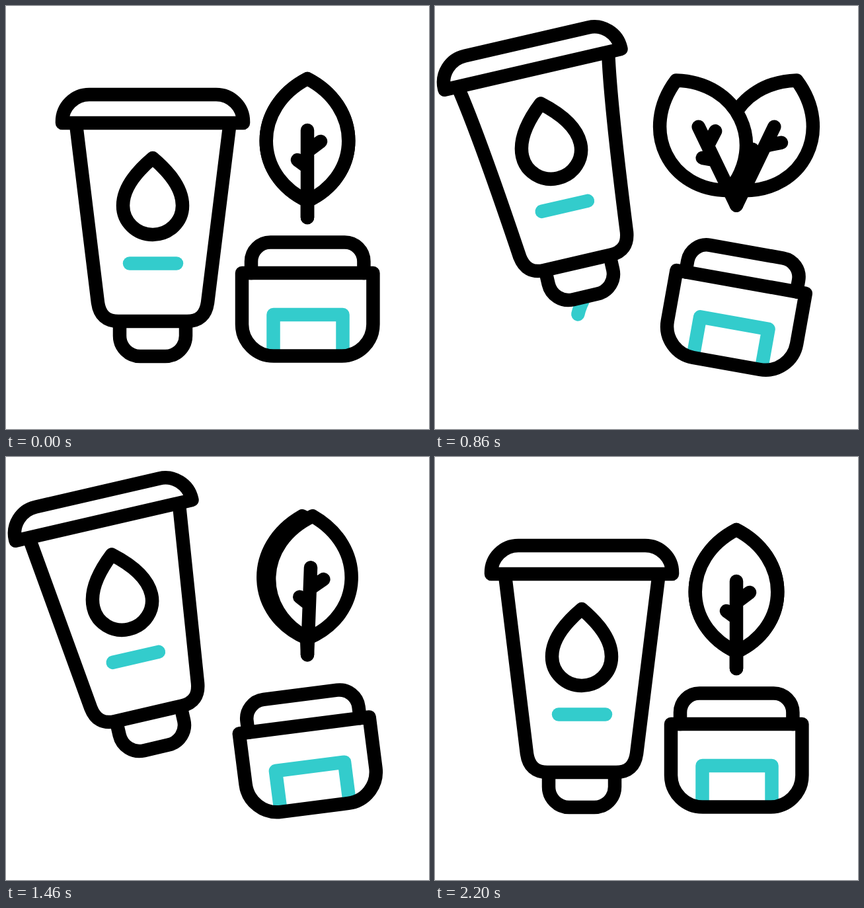
An HTML page that plays this animation: 640x640 px, repeating every 2400 ms.

```html
<!DOCTYPE html>
<html lang="en">
<head>
<meta charset="utf-8">
<title>Cosmetics icon</title>
<style>
  html, body { margin: 0; height: 100%; overflow: hidden; background: #fff; }
  svg { display: block; width: 100%; height: 100%; }
  .ink { fill: #fff; stroke: #000; stroke-width: 20.5; stroke-linecap: round; stroke-linejoin: round; }
  .teal { fill: none; stroke: #3cc; }
</style>
</head>
<body>
<svg viewBox="0 0 640 640">
  <defs>
    <g id="leaf">
      <path d="M456 110C373 153 373 256 456 295C539 256 539 153 456 110Z"/>
      <path fill="none" d="M456 188V320M476 205L456 220M441 233L456 244"/>
    </g>
  </defs>
  <g class="ink">
    <path id="drip" class="teal" pathLength="1" d="M228 438C205 478 215 500 240 517S307 570 269 623"/>
    <g id="tube">
      <path id="cap"/>
      <path id="walls"/>
      <path id="rim"/>
      <path d="M222 230Q177 268 177 302a45 44 0 0 0 90 0Q267 268 222 230z"/>
      <path class="teal" d="M187 389.5H258"/>
    </g>
    <use id="back" href="#leaf"/>
    <use id="front" href="#leaf"/>
    <g id="jar">
      <path id="lid"/>
      <path class="teal" stroke-linecap="butt" d="M404.5 525V467H509.5V525"/>
      <path id="pot" fill="none"/>
    </g>
  </g>
</svg>
<script>
const LOOP = 2400;
const el = id => document.getElementById(id);
const [drip, tube, walls, back, front, jar] =
  ['drip', 'tube', 'walls', 'back', 'front', 'jar'].map(el);

// U shape around x = cx: straight at the rim, rounded at the base.
function cup(id, cx, half, rim, base, r, end = '') {
  const side = base - Math.sign(base - rim) * r;
  const [left, right] = [cx - half, cx + half];
  el(id).setAttribute('d', `M${left} ${rim}V${side}Q${left} ${base} ${left} ${base}`
    .replace(/Q.*/, '') + arc(left + r, base, r, base < rim) +
    `H${right - r}` + arc(right, side, r, base < rim) + `V${rim}${end}`);
}

function arc(x, y, r, clockwise) {
  return `A${r} ${r} 0 0 ${+clockwise} ${x} ${y}`;
}

cup('cap', 222, 50, 480, 530, 31);
cup('rim', 222, 137, 177, 134, 41, 'z');
cup('lid', 456.2, 85.2, 404, 357.5, 29);
cup('pot', 456.2, 99.2, 404, 529.5, 48, 'z');

// Smooth 0..1 step between two times.
function ease(t, from, to) {
  const p = Math.min(1, Math.max(0, (t - from) / (to - from)));
  return p * p * (3 - 2 * p);
}

function pose(node, dy, angle, x, y) {
  node.setAttribute('transform', `translate(0 ${dy}) rotate(${angle} ${x} ${y})`);
}

function draw(t) {
  const tilt = ease(t, 200, 700) - ease(t, 1500, 2000);
  pose(tube, -89.5 * tilt, -13 * tilt, 222, 506);

  const squeeze = 5 * (ease(t, 700, 900) - ease(t, 900, 1100));
  walls.setAttribute('d', `M106.5 183Q${116 + squeeze} 260 139 449` +
    `Q143 477 170 477H274Q301 477 305 449Q${328.5 - squeeze} 260 338 183`);

  const head = ease(t, 790, 1090), tail = ease(t, 1000, 1400);
  drip.style.display = head > tail ? '' : 'none';
  drip.setAttribute('stroke-dasharray', `${head - tail} 2`);
  drip.setAttribute('stroke-dashoffset', -tail);

  const lift = -25 * (ease(t, 200, 1200) - ease(t, 1200, 2200));
  const spread = -27 * ease(t, 200, 800) + 31 * ease(t, 800, 1300)
    - 10.3 * ease(t, 1300, 1900) + 6.3 * ease(t, 1900, 2200);
  pose(back, lift, -spread, 456, 320);
  pose(front, lift, spread, 456, 320);

  const bob = 25 * (ease(t, 200, 700) - 2 * ease(t, 700, 1200)
    + 2 * ease(t, 1200, 1700) - ease(t, 1700, 2200));
  const rock = 11 * ease(t, 200, 800) - 21.7 * ease(t, 800, 1300)
    + 18.2 * ease(t, 1300, 1880) - 7.5 * ease(t, 1880, 2200);
  pose(jar, bob, rock, 456, 443.5);
}

const start = performance.now();
function tick() {
  draw((performance.now() - start) % LOOP);
  requestAnimationFrame(tick);
}
tick();
</script>
</body>
</html>
```
